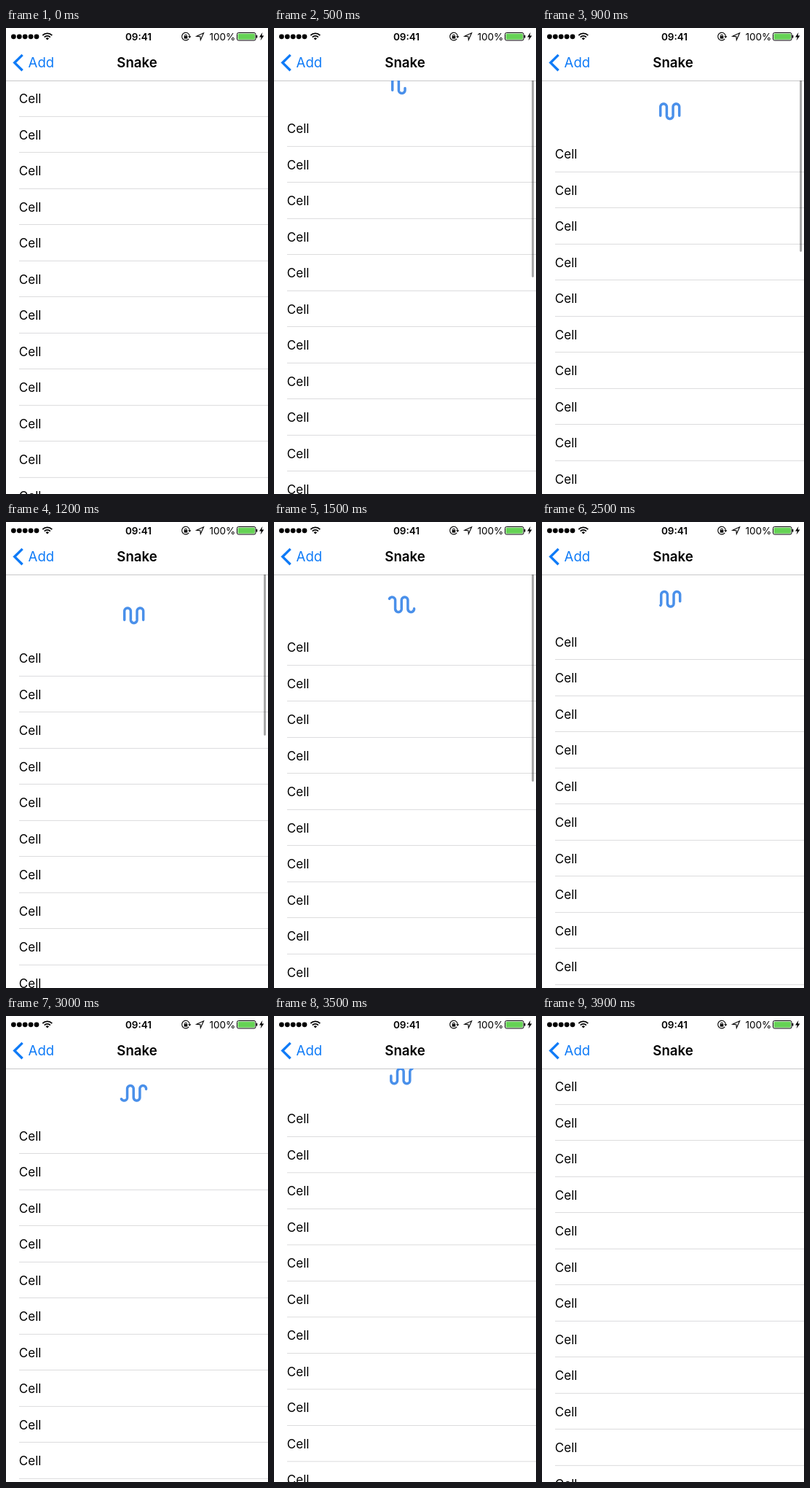
These frames come from a looping animation (360 by 639 pixels, 4300 ms). An HTML page with a canvas:

```html
<!DOCTYPE html>
<html lang="en">
<head>
<meta charset="utf-8">
<title>Pull to refresh</title>
<style>
  html, body { margin: 0; width: 100%; height: 100%; overflow: hidden; background: #fff; }
  canvas { display: block; width: 360px; height: 639px; }
</style>
</head>
<body>
<canvas id="stage" width="360" height="639"></canvas>
<script>
const W = 360, H = 639, NAV = 72, ROW = 49.5, HEADER = 67.5;
const LOOP = 4300, STEP = 100;
const RELEASE = 1334, CLOSE = 3300, CLOSE_END = 3800;
const BLUE = '#0f7bf7', SNAKE = '#4a90ea';
const PULL = [[0, 0], [100, 3], [200, 11], [500, 41], [900, 76], [1200, 90], [1334, 92]];

const ctx = document.getElementById('stage').getContext('2d');
const clamp = v => Math.max(0, Math.min(1, v));

function text(str, x, y, size, { weight = 400, color = '#000', align = 'left' } = {}) {
  ctx.font = `${weight} ${size}px Inter, Roboto, sans-serif`;
  ctx.fillStyle = color;
  ctx.textAlign = align;
  ctx.fillText(str, x, y);
}

function line(points, width, color, close = false) {
  ctx.beginPath();
  for (const [x, y] of points) ctx.lineTo(x, y);
  if (close) ctx.closePath();
  ctx.lineWidth = width;
  ctx.strokeStyle = color;
  ctx.stroke();
}

function fillPoly(points, color = '#000') {
  ctx.beginPath();
  for (const [x, y] of points) ctx.lineTo(x, y);
  ctx.fillStyle = color;
  ctx.fill();
}

function disc(x, y, r) {
  ctx.beginPath();
  ctx.arc(x, y, r, 0, 7);
  ctx.fillStyle = '#000';
  ctx.fill();
}

function roundBox(x, y, w, h, r, color) {
  ctx.beginPath();
  ctx.roundRect(x, y, w, h, r);
  ctx.fillStyle = color;
  ctx.fill();
}

// ---- motion ----

function pullAt(t) {
  const i = PULL.findIndex(([time]) => time >= t);
  if (i <= 0) return 0;
  const [t0, a] = PULL[i - 1], [t1, b] = PULL[i];
  return a + (b - a) * (t - t0) / (t1 - t0);
}

function offsetAt(t) {
  if (t < RELEASE) return pullAt(t);
  if (t < CLOSE) {
    const a = (t - RELEASE) * 0.0145;   // critically damped bounce
    const over = (92 - HEADER) * (1 + a) * Math.exp(-a);
    return HEADER + (over < 0.1 ? 0 : over);
  }
  const p = clamp((t - CLOSE) / (CLOSE_END - CLOSE));
  return HEADER * (1 + Math.cos(Math.PI * p)) / 2;
}

// ---- snake: a window sliding along a wave of columns and half circles ----

const PITCH = 8.65, TALL = 20.5, R = PITCH / 2;
const ARC = Math.PI * R, STRAIGHT = TALL - PITCH, SEG = ARC + STRAIGHT;
const LENGTH = 3 * SEG + STRAIGHT;

function wavePoint(s) {
  const k = Math.round(s / SEG), d = s - k * SEG, side = Math.sign(d);
  const flip = k % 2 ? 1 : -1;
  const base = TALL / 2 - R;
  if (Math.abs(d) < ARC / 2) {
    return [k * PITCH + R * Math.sin(d / R), flip * (base + R * Math.cos(d / R))];
  }
  return [k * PITCH + side * R, flip * (base - Math.abs(d) + ARC / 2)];
}

function drawSnake(t, offset) {
  const loading = t >= RELEASE;
  const phase = 0.5 + (loading ? (t - RELEASE) / 600 : 0);
  const drawn = LENGTH * (loading ? 1 : clamp(offset / HEADER));
  const mid = phase * 2 * SEG;
  const cx = 175.7 - mid * PITCH / SEG, cy = NAV + offset - HEADER / 2;
  const points = [];
  const count = Math.ceil(drawn * 2);
  for (let i = 0; i <= count; i++) {
    const [x, y] = wavePoint(mid - LENGTH / 2 + drawn * i / count);
    points.push([cx + x, cy + y]);
  }
  ctx.lineCap = ctx.lineJoin = 'round';
  line(points, 3.5, SNAKE);
}

// ---- screen parts ----

function drawTable(t) {
  const offset = offsetAt(t);
  ctx.save();
  ctx.beginPath();
  ctx.rect(0, NAV, W, H - NAV);
  ctx.clip();
  if (offset > 0) drawSnake(t, offset);
  for (let y = NAV + offset; y < H; y += ROW) {
    text('Cell', 17.8, y + 31, 17);
    ctx.fillStyle = '#c0c0c3';
    ctx.fillRect(18, y + ROW - 0.5625, W - 18, 0.5625);
  }
  const shown = t > 0 ? clamp((2150 - t) / 350) : 0;
  if (shown > 0) {
    const end = t < RELEASE ? 383 - offset : 361 - 0.65 * (offset - HEADER);
    roundBox(354.2, 70, 2.8, end - 70, 1.4, `rgba(0,0,0,${0.36 * shown})`);
  }
  ctx.restore();
}

function drawWifi() {
  const x = 56.8, y = 16.6;
  ctx.lineCap = 'butt';
  ctx.strokeStyle = '#000';
  ctx.lineWidth = 1.9;
  for (const r of [5.7, 9.2]) {
    ctx.beginPath();
    ctx.arc(x, y, r, -Math.PI * 0.75, -Math.PI * 0.25);
    ctx.stroke();
  }
  ctx.beginPath();
  ctx.moveTo(x, y);
  ctx.arc(x, y, 3.2, -Math.PI * 0.75, -Math.PI * 0.25);
  ctx.fillStyle = '#000';
  ctx.fill();
}

function drawLock() {
  const x = 247, y = 11.6;
  ctx.lineCap = 'butt';
  ctx.strokeStyle = '#000';
  ctx.lineWidth = 1.1;
  ctx.beginPath();
  ctx.arc(x, y, 5.3, 0.65, 2 * Math.PI);
  ctx.stroke();
  fillPoly([[250.2, 11.2], [254.4, 11.2], [252.3, 14]]);
  ctx.fillStyle = '#000';
  ctx.fillRect(x - 2.3, y - 0.6, 4.6, 3.6);
  ctx.beginPath();
  ctx.arc(x, y - 0.9, 1.5, Math.PI, 0);
  ctx.stroke();
}

function drawStatus() {
  for (let i = 0; i < 5; i++) disc(10.4 + 7.9 * i, 11.8, 3.4);
  drawWifi();
  text('09:41', 182, 16.6, 13.5, { weight: 600, align: 'center' });
  drawLock();
  ctx.lineJoin = 'miter';
  line([[262, 11.3], [271.6, 6.8], [267.3, 16.4], [266.9, 11.7]], 1.1, '#000', true);
  text('100%', 279.6, 16.6, 13.5);
  ctx.beginPath();
  ctx.roundRect(317.5, 6.5, 25.5, 10.5, 2);
  ctx.lineWidth = 1;
  ctx.strokeStyle = '#000';
  ctx.stroke();
  roundBox(318.7, 7.7, 23.1, 8.1, 1, '#65d255');
  roundBox(343.6, 9.8, 1.7, 4, 0.8, '#000');
  fillPoly([[352.4, 6], [348, 12.4], [350.8, 12.4], [349.6, 17.2], [354.4, 10.6], [351.5, 10.6]]);
}

function drawNav() {
  ctx.fillStyle = '#c8c8c9';
  ctx.fillRect(0, NAV, W, 1);
  ctx.lineCap = 'butt';
  ctx.lineJoin = 'miter';
  line([[22.6, 36.9], [11.8, 47.6], [22.6, 58.3]], 3.4, BLUE);
  text('Add', 30.6, 54, 18.6, { color: BLUE });
  text('Snake', 180, 54, 18.6, { weight: 600, align: 'center' });
}

function draw() {
  const t = Math.floor(performance.now() % LOOP / STEP) * STEP;
  ctx.fillStyle = '#fff';
  ctx.fillRect(0, 0, W, H);
  drawNav();
  drawTable(t);
  drawStatus();
  requestAnimationFrame(draw);
}
draw();
</script>
</body>
</html>
```
